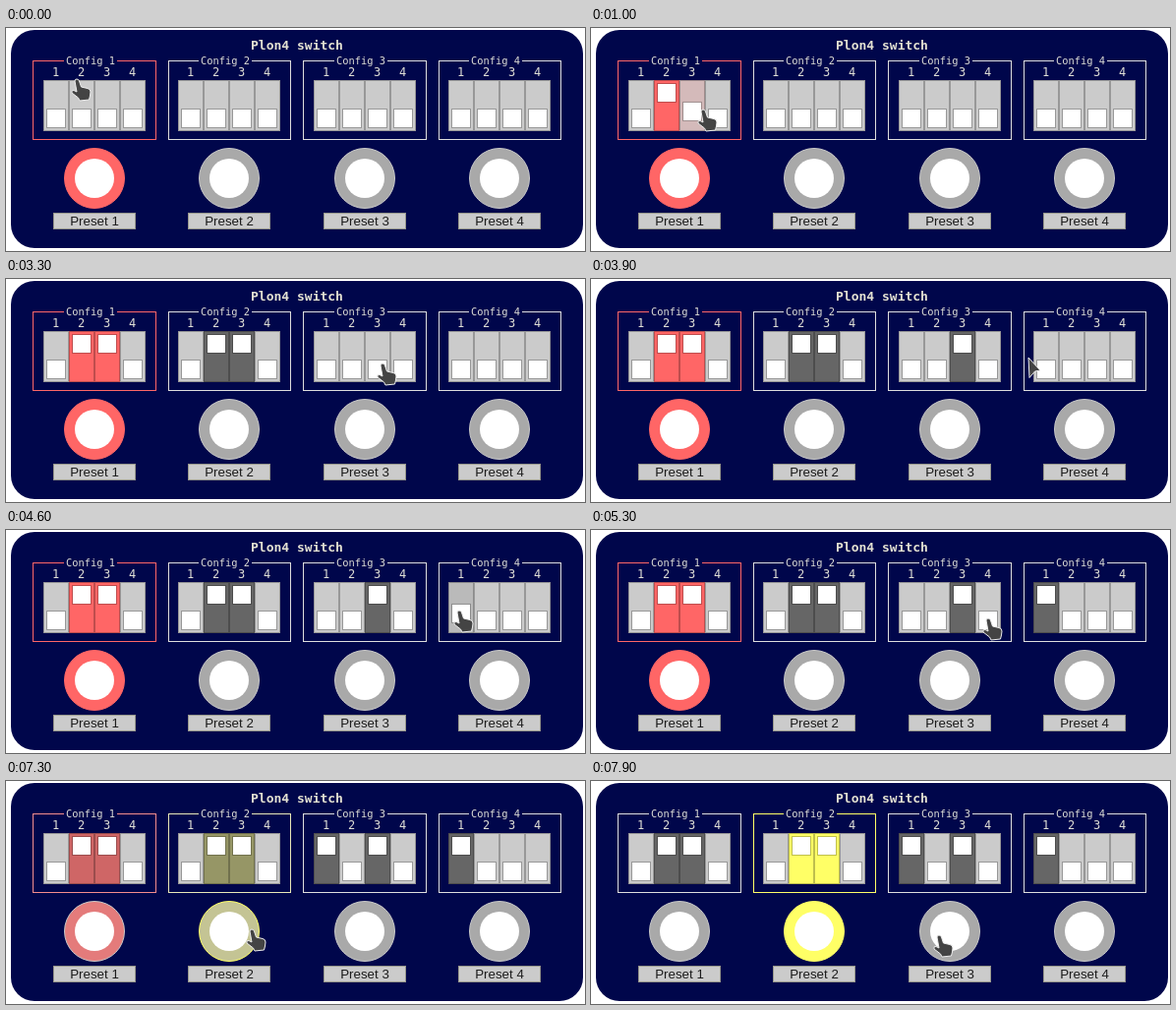
Recreate the animation shown at these times as an HTML page. Size 589x227 px, loop 8000 ms.

```html
<!DOCTYPE html>
<html lang="en">
<head>
<meta charset="utf-8">
<title>Preset switch</title>
<style>
  html, body { margin: 0; width: 100%; height: 100%; overflow: hidden; background: #fff; }
  svg { display: block; }
  text { text-anchor: middle; font-family: "DejaVu Sans Mono", monospace; fill: #deded6; }
  .title { font-size: 13px; font-weight: bold; fill: #e4e2d2; }
  .legend { font-size: 10.4px; }
  .digit { font-size: 12px; }
  .preset { font: 13.33px "Liberation Sans", Arial, sans-serif; fill: #1c1c1c; }
</style>
</head>
<body>
<svg id="stage" width="589" height="227" viewBox="0 0 589 227"></svg>
<script>
const LOOP = 8000, STEP = 100, FADE = 300, SLIDE = 340;
const STALL = { from: 2400, to: 3300 };
const NAVY = '#00064b';
const gray = v => [v, v, v];
const RED = [255, 102, 102], YELLOW = [255, 255, 102];
const BLACK = gray(0), DARK = gray(102), RING = gray(169), EDGE = gray(200), OFF = gray(203), FRAME = gray(222);

// Where the pointer arrives, and when it clicks before moving on
const STOPS = [
  { at: 0, x: 72, y: 53 },
  { at: 200, x: 72, y: 80, click: 450 },
  { at: 800, x: 98, y: 84, click: 950 },
  { at: 1400, x: 242, y: 82, click: 1650 },
  { at: 2000, x: 219, y: 82, click: 2250 },
  { at: 3300, x: 383, y: 87, click: 3350 },
  { at: 3900, x: 445, y: 80 },
  { at: 4300, x: 459, y: 82, click: 4550 },
  { at: 5000, x: 474, y: 87 },
  { at: 5750, x: 299, y: 96 },
  { at: 6100, x: 321, y: 95, click: 6350 },
  { at: 6700, x: 233, y: 151, click: 7205 },
  { at: 7900, x: 354, y: 158 }
];

const stage = document.getElementById('stage');
const clamp = v => Math.max(0, Math.min(1, v));
const lerp = (a, b, k) => a + (b - a) * k;
const mix = (a, b, k) => a.map((v, i) => lerp(v, b[i], k));
const rgb = c => `rgb(${c.map(Math.round).join()})`;
const easeOut = k => 1 - (1 - k) ** 2;
const centerOf = group => Math.floor(90 + 137.5 * group);

function set(el, attrs) {
  for (const key in attrs) el.setAttribute(key, attrs[key]);
}
function add(tag, attrs, label) {
  const el = document.createElementNS('http://www.w3.org/2000/svg', tag);
  set(el, attrs);
  if (label) el.textContent = label;
  return stage.appendChild(el);
}

// The switch or preset button under a point
function hit({ x, y }) {
  const group = Math.round((x - 90) / 137.5);
  const dx = x - centerOf(group);
  if (Math.abs(dx) < 52 && y >= 53 && y <= 105) return `switch ${group} ${Math.floor((dx + 52) / 26)}`;
  if (Math.hypot(dx, y - 153) < 31) return `preset ${group}`;
  return null;
}

const clickTimes = {};
for (const stop of STOPS) if (stop.click) clickTimes[hit(stop)] = stop.click;
const since = (t, name) => t - (clickTimes[name] ?? Infinity);

function buildGroup(index) {
  const cx = centerOf(index);
  const left = Math.round(27 + 137.5 * index) + 0.5;
  const border = add('rect', { x: left, y: 33.5, width: cx + 62.5 - left, height: 80, fill: 'none' });
  add('rect', { x: cx - 31, y: 31, width: 54, height: 5, fill: NAVY });
  add('text', { x: cx - 4, y: 37, class: 'legend' }, `Config ${index + 1}`);
  const cells = [0, 1, 2, 3].map(n => {
    const x = cx - 52 + 26 * n;
    add('text', { x: x + 12.5, y: 49, class: 'digit' }, `${n + 1}`);
    const body = add('rect', { x: x + 0.5, y: 53.5, width: 25, height: 51 });
    const knob = add('rect', { x: x + 3.5, width: 19, height: 19, fill: '#fff' });
    return { body, knob };
  });
  const ring = add('circle', { cx, cy: 153, r: 30.5 });
  add('circle', { cx, cy: 153, r: 20, fill: '#fff' });
  add('rect', { x: cx - 41.5, y: 188.5, width: 83, height: 16, fill: rgb(OFF), stroke: '#98988c' });
  add('text', { x: cx, y: 201, class: 'preset' }, `Preset ${index + 1}`);
  return { border, cells, ring };
}

add('rect', { x: 5, y: 2, width: 582, height: 222, rx: 24, fill: NAVY });
add('text', { x: 296, y: 22, class: 'title' }, 'Plon4 switch');
const groups = [0, 1, 2, 3].map(buildGroup);

const ink = { fill: '#444', stroke: '#eee', 'stroke-linejoin': 'round' };
const hand = add('path', {
  ...ink,
  d: 'M-2 1Q-2-1 0-1Q2-1 2.5 1L4.5 7L11 8.5Q14 9 14 12L13.5 16L12.5 20L3 21L1.5 18L-5 13Q-6 10-3 10.5L0 12Z'
});
const arrow = add('path', { ...ink, d: 'M0 0L12 13L6.5 14L1 20.5Z' });

function pointerAt(t) {
  const i = STOPS.findIndex(stop => stop.at > t);
  if (i < 0) return STOPS[STOPS.length - 1];
  const a = STOPS[i - 1], b = STOPS[i];
  const leave = a.click ?? a.at;
  const k = clamp((t - leave) / (b.at - leave));
  return { x: Math.round(lerp(a.x, b.x, k)), y: Math.round(lerp(a.y, b.y, k)) };
}

function drawGroup({ border, cells, ring }, index, t, swap) {
  const accent = index ? YELLOW : RED;
  const active = [1 - swap, swap, 0, 0][index];
  const selected = index === (swap > 0 ? 1 : 0);
  const lit = mix(DARK, accent, active);
  set(border, { stroke: rgb(mix(FRAME, accent, active)) });
  set(ring, { fill: rgb(mix(RING, accent, active)), stroke: rgb(selected ? accent : EDGE) });
  cells.forEach(({ body, knob }, n) => {
    const age = since(t, `switch ${index} ${n}`);
    const fill = mix(OFF, lit, clamp(age / FADE));
    const stroke = rgb(mix(fill, BLACK, 0.25));
    set(body, { fill: rgb(fill), stroke });
    set(knob, { y: lerp(82.5, 56.5, easeOut(clamp(age / SLIDE))), stroke });
  });
}

function render(time) {
  let t = Math.floor(time / STEP) * STEP;
  if (t > STALL.from && t < STALL.to) t = STALL.from;

  const swap = clamp(since(t, 'preset 1') / FADE);
  groups.forEach((group, index) => drawGroup(group, index, t, swap));

  const point = pointerAt(t);
  const transform = `translate(${point.x} ${point.y})`;
  const over = hit(point) !== null;
  set(hand, { transform, visibility: over ? 'visible' : 'hidden' });
  set(arrow, { transform, visibility: over ? 'hidden' : 'visible' });
}

const start = performance.now();
function tick() {
  render((performance.now() - start) % LOOP);
  requestAnimationFrame(tick);
}
tick();
</script>
</body>
</html>
```
